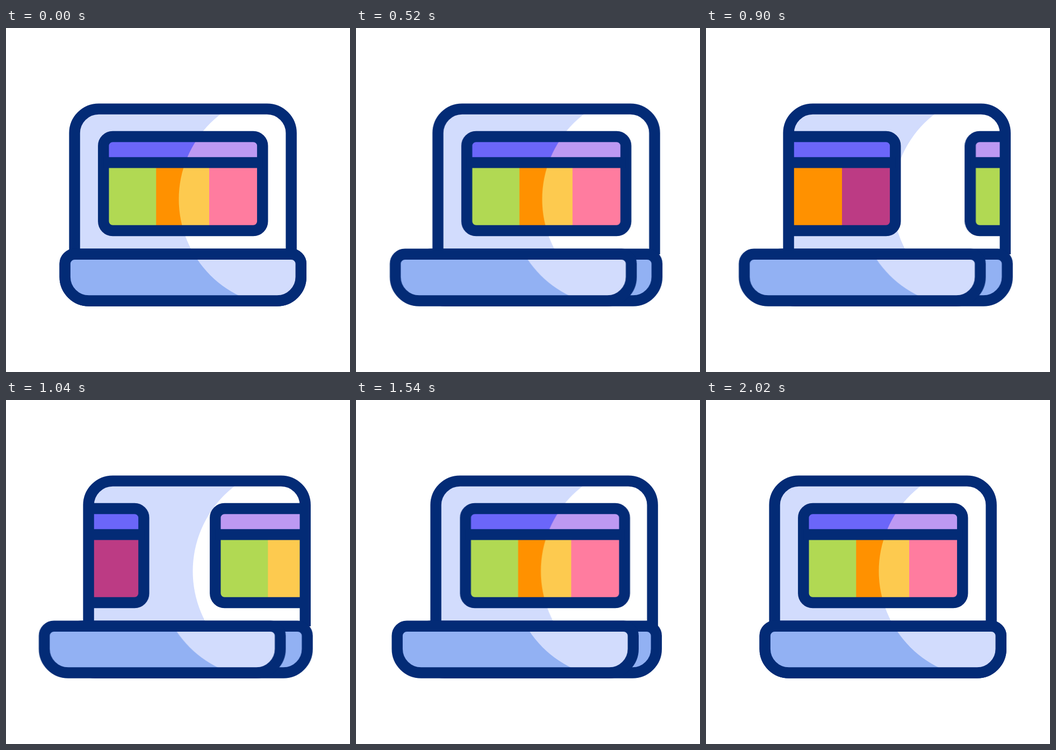
Write an HTML page without scripts that moves like this. It is 640 px wide and 640 px high and loops after 2220 ms.

```html
<!DOCTYPE html>
<html lang="en">
<head>
<meta charset="utf-8">
<title>Laptop with scrolling window</title>
<style>
  html, body { margin: 0; width: 100%; height: 100%; overflow: hidden; background: #fff; }
  svg { display: block; width: 100%; height: 100%; }

  .line { fill: none; stroke: #032b76; stroke-width: 20.4; }
  .screen, .bezel, .front, .back, .out, .in, .fade {
    animation: 2220ms linear infinite;
  }
  .screen, .bezel, .front, .back { --ease: cubic-bezier(.33, 0, .67, 1); }
  .screen { --dx: 26px; animation-name: sway; }
  .front { --dx: -38.5px; animation-name: sway; }
  .back { --dx: 11.7px; animation-name: sway; }
  .bezel { --dx: 26px; animation-name: sway-early; }
  .out { animation-name: leave; }
  .in { animation-name: enter; }
  .fade { animation-name: fade; }

  @keyframes sway {
    0% { transform: translateX(0); animation-timing-function: cubic-bezier(.33, 0, .67, 1); }
    27.027% { transform: translateX(var(--dx)); }
    63.063% { transform: translateX(var(--dx)); animation-timing-function: cubic-bezier(.33, 0, .67, 1); }
    90.09%, 100% { transform: translateX(0); }
  }
  @keyframes sway-early {
    0% { transform: translateX(0); animation-timing-function: cubic-bezier(.33, 0, .67, 1); }
    27.027% { transform: translateX(var(--dx)); }
    61.26% { transform: translateX(var(--dx)); animation-timing-function: cubic-bezier(.33, 0, .67, 1); }
    90.09%, 100% { transform: translateX(0); }
  }
  @keyframes leave {
    0% { transform: translateX(0); }
    26.89% { transform: translateX(0); animation-timing-function: ease-in-out; }
    52.97%, 100% { transform: translateX(-278px); }
  }
  @keyframes enter {
    0% { transform: translateX(360px); }
    31.4% { transform: translateX(360px); animation-timing-function: cubic-bezier(.33, 0, .67, 1); }
    62.61%, 100% { transform: translateX(0); }
  }
  @keyframes fade {
    0%, 47.75% { opacity: 1; }
    53.33%, 100% { opacity: 0; }
  }
</style>
</head>
<body>
<svg viewBox="0 0 640 640" xmlns="http://www.w3.org/2000/svg">
  <defs>
    <path id="lid" d="M127.6 421V195.6a45 45 0 0 1 45-45H485.7a45 45 0 0 1 45 45V421"/>
    <path id="base" d="M127.7 420.7H530.8a18 18 0 0 1 18 18V463a44.5 44.5 0 0 1-44.5 44.5H154.2a44.5 44.5 0 0 1-44.5-44.5V438.7a18 18 0 0 1 18-18Z"/>
    <circle id="shine" cx="521.5" cy="318.5" r="200"/>
    <rect id="pane" x="181.3" y="202" width="296" height="175" rx="17.3"/>

    <clipPath id="in-lid"><use href="#lid"/></clipPath>
    <clipPath id="in-base"><use href="#base"/></clipPath>
    <clipPath id="in-shine"><use href="#shine"/></clipPath>
    <clipPath id="in-pane"><use href="#pane"/></clipPath>

    <!-- window colours: shaded, lit, and outline -->
    <g id="dark" clip-path="url(#in-pane)">
      <rect x="181" y="202" width="297" height="49" fill="#6b66f9"/>
      <rect x="181" y="250" width="99" height="128" fill="#b1d953"/>
      <rect x="279.3" y="250" width="99" height="128" fill="#ff9100"/>
      <rect x="378" y="250" width="100" height="128" fill="#bc3b84"/>
    </g>
    <g id="lit" clip-path="url(#in-pane)">
      <rect x="181" y="202" width="297" height="49" fill="#bd99f2"/>
      <rect x="181" y="250" width="99" height="128" fill="#b1d953"/>
      <rect x="279.3" y="250" width="99" height="128" fill="#fdca4f"/>
      <rect x="378" y="250" width="100" height="128" fill="#ff7c9f"/>
    </g>
    <g id="frame" class="line">
      <use href="#pane"/>
      <path d="M181.3 250.4H477.3"/>
    </g>
  </defs>

  <g class="screen">
    <g clip-path="url(#in-lid)">
      <use href="#lid" fill="#d2dcfd"/>
      <use href="#shine" fill="#fff"/>
      <g class="fade">
        <g class="out"><use href="#dark"/></g>
        <g clip-path="url(#in-shine)"><g class="out"><use href="#lit"/></g></g>
        <g class="out"><use href="#frame"/></g>
      </g>
      <g>
        <g class="in"><use href="#dark"/></g>
        <g clip-path="url(#in-shine)"><g class="in"><use href="#lit"/></g></g>
        <g class="in"><use href="#frame"/></g>
      </g>
    </g>
  </g>
  <g class="bezel"><use href="#lid" class="line"/></g>

  <g class="back">
    <use href="#base" fill="#92b1f3"/>
    <use href="#base" class="line"/>
  </g>
  <g class="front">
    <use href="#base" fill="#92b1f3"/>
    <g clip-path="url(#in-base)"><use href="#shine" fill="#d2dcfd"/></g>
    <use href="#base" class="line"/>
  </g>
</svg>
</body>
</html>
```
